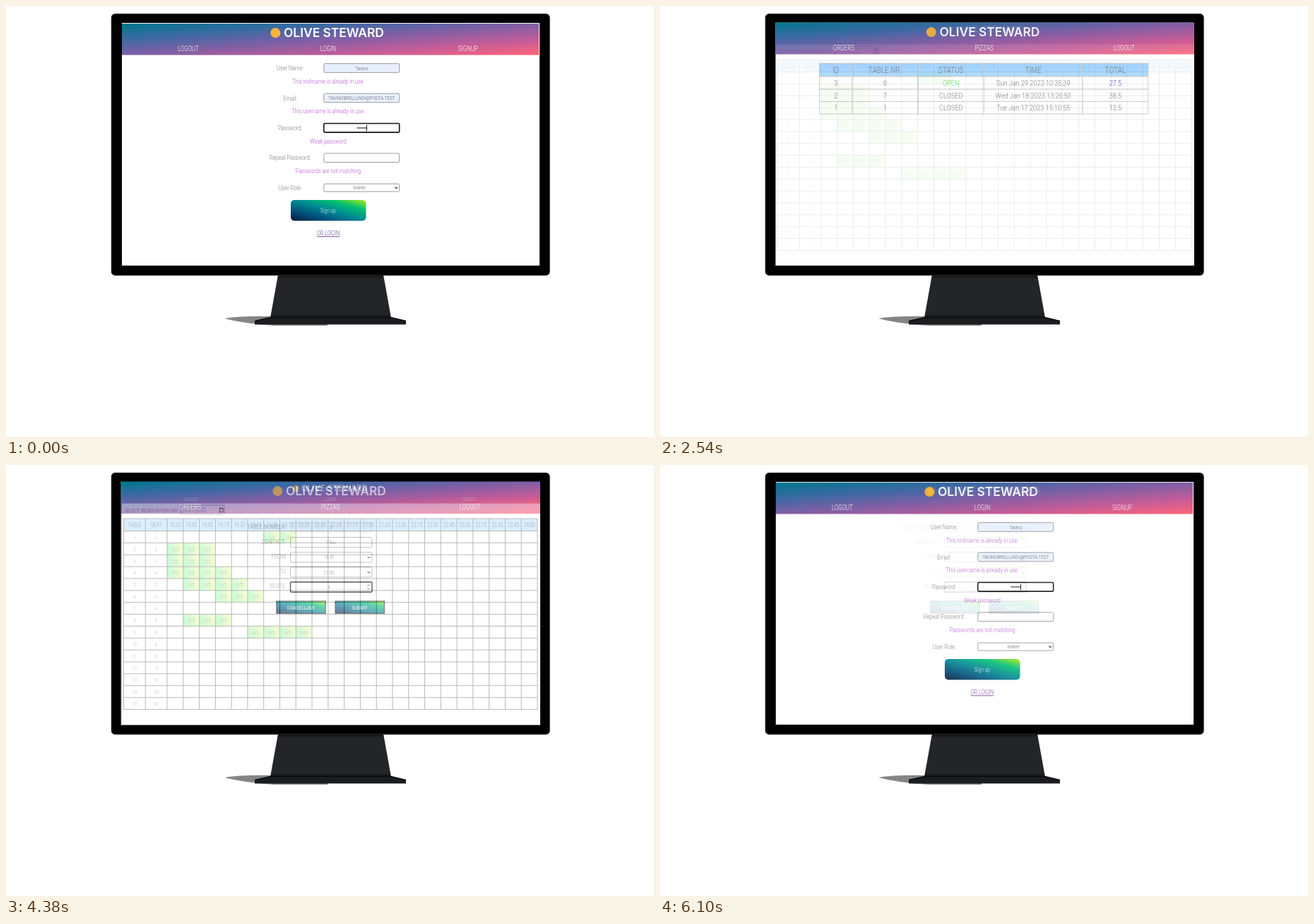
An HTML page that plays this animation: 917x611 px, repeating every 6160 ms.

```html
<!DOCTYPE html>
<html lang="en">
<head>
<meta charset="utf-8">
<title>Monitor slideshow</title>
<style>
  html, body { margin: 0; width: 100%; height: 100%; overflow: hidden; background: #fff; }
  svg { display: block; }
  text { font-family: Roboto, sans-serif; font-weight: 300; }
  .title { font-family: Inter, sans-serif; font-weight: 600; fill: #fff; }
</style>
</head>
<body>
<svg id="stage" width="917" height="611" viewBox="0 0 917 611">
  <defs>
    <linearGradient id="header" x1="0" y1="0" x2="1" y2="1">
      <stop offset="0" stop-color="#00778c"/>
      <stop offset=".25" stop-color="#3a6aa3"/>
      <stop offset=".5" stop-color="#805fa5"/>
      <stop offset=".75" stop-color="#c35c99"/>
      <stop offset="1" stop-color="#ff6579"/>
    </linearGradient>
    <linearGradient id="button" x1="0" y1="1" x2="1" y2="0">
      <stop offset="0" stop-color="#051937"/>
      <stop offset=".25" stop-color="#004d7a"/>
      <stop offset=".5" stop-color="#008793"/>
      <stop offset=".75" stop-color="#00bf72"/>
      <stop offset="1" stop-color="#a8eb12"/>
    </linearGradient>
    <linearGradient id="booked" x1="0" y1=".2" x2="1" y2="0">
      <stop offset="0" stop-color="#86f3a4"/>
      <stop offset="1" stop-color="#f4fb86"/>
    </linearGradient>
    <linearGradient id="stand" x1="0" y1="0" x2="0" y2="1">
      <stop offset="0" stop-color="#111214"/>
      <stop offset=".1" stop-color="#242529"/>
      <stop offset=".92" stop-color="#242529"/>
      <stop offset="1" stop-color="#0c0c0e"/>
    </linearGradient>
  </defs>
  <path d="M309 443Q335 439 376 440L372 452Q335 450 309 443Z" fill="#858585"/>
  <path d="M352 451H455V453H380Z" fill="#777"/>
  <path d="M385 381H534L545 442H374Z" fill="url(#stand)"/>
  <path d="M374 441H545L566 446V451.5H352V446Z" fill="#1b1c20"/>
  <path d="M352 446.5L374 441.5H545L566 446.5" fill="none" stroke="#08080a"/>
  <rect x="149.5" y="11.5" width="619.5" height="370" rx="5" stroke="#1d1d1d" stroke-width="1.5"/>
</svg>
<script>
const SQUEEZE = 0.78; // the screens are shown narrower than they were laid out
const GREY = '#777', PURPLE = '#b650d2', SKY = '#a6d5ff';

const box = (x1, y1, x2, y2, fill, stroke = 'none', extra = '') =>
  `<rect x="${x1}" y="${y1}" width="${x2 - x1}" height="${y2 - y1}" fill="${fill}" stroke="${stroke}" ${extra}/>`;

const text = (x, y, str, size, fill = GREY, anchor = 'middle', extra = '') =>
  `<text transform="translate(${x} ${y}) scale(${SQUEEZE} 1)" font-size="${size}" fill="${fill}" text-anchor="${anchor}" ${extra}>${str}</text>`;

const line = (d, color, width = 1) => `<path d="${d}" fill="none" stroke="${color}" stroke-width="${width}"/>`;

const chevron = (x, y) => line(`M${x - 2} ${y - 1}l2 2l2 -2`, '#333', 1.1);

const screen = (x1, y1, x2, y2) => box(160, 20, 759, 372, '#000') + box(x1, y1, x2, y2, '#fff');

function header([x1, y1, x2, y2], titleX, titleY, titleSize, links, navY, navSize) {
  const mark = titleSize * 0.4;
  return box(x1, y1, x2, y2, 'url(#header)') +
    `<circle cx="${titleX - titleSize * 0.67}" cy="${titleY - titleSize * 0.34}" r="${mark}" fill="#f5b43c"/>` +
    `<text class="title" x="${titleX}" y="${titleY}" font-size="${titleSize}">OLIVE STEWARD</text>` +
    links.map(([x, label]) => text(x, navY, label, navSize, '#fff')).join('');
}

function field(x1, y1, x2, y2, { value = '', fill = '#fff', focus = false, select = false, cx = (x1 + x2) / 2, border = '#999' } = {}) {
  const frame = box(x1, y1, x2, y2, fill, focus ? '#111' : border, `rx="1.5" stroke-width="${focus ? 1.6 : 1}"`);
  const mid = (y1 + y2) / 2;
  return frame + text(cx, mid + 2.6, value, 8, '#555') + (select ? chevron(x2 - 4.5, mid) : '');
}

function signup() {
  const labels = ['User Name:', 'Email:', 'Password:', 'Repeat Password:', 'User Role:'];
  const hints = ['This nickname is already in use.', 'This username is already in use.', 'Weak password', 'Passwords are not matching'];
  const fields = [
    { value: 'Tavino', fill: '#e8f0fe' },
    { value: 'TAVINOBRELLUNDI@POSTA.TEST', fill: '#e8f0fe' },
    { focus: true },
    {},
    { value: 'Waiter', select: true, cx: 500 },
  ];
  let out = screen(164, 24, 755, 368) +
    header([164, 25, 754, 69.5], 393, 44, 17.4, [[258, 'LOGOUT'], [456, 'LOGIN'], [654, 'SIGNUP']], 64, 10.2);
  fields.forEach((options, i) => {
    const y = 88 + i * 42.4, half = options.select ? 5.5 : 6.3;
    out += text(402, y + 3.2, labels[i], 9.5) + field(449.8, y - half, 556.7, y + half, options);
    if (hints[i]) out += text(456, y + 21.9, hints[i], 9.5, PURPLE);
  });
  for (let i = 0; i < 7; i++) out += `<circle cx="${497.5 + i * 2}" cy="172.8" r=".9" fill="#222"/>`;
  return out + line('M510.5 168.5v9', '#222') +
    box(403, 275, 509.5, 304.5, 'url(#button)', 'none', 'rx="5"') +
    text(456, 293, 'Sign up', 8.6, '#e4eeee') +
    text(456, 325.3, 'OR LOGIN', 9.5, '#703c98', 'middle', 'text-decoration="underline"');
}

function orders() {
  const cols = [225.5, 272, 365.2, 458.3, 598, 690.8];
  const edges = [81.5, 100, 118, 135.5, 153];
  const rows = [
    ['ID', 'TABLE NR.', 'STATUS', 'TIME', 'TOTAL'],
    ['3', '6', 'OPEN', 'Sun Jan 29 2023 10:35:39', '27.5'],
    ['2', '7', 'CLOSED', 'Wed Jan 18 2023 13:26:50', '38.5'],
    ['1', '1', 'CLOSED', 'Tue Jan 17 2023 15:10:55', '12.5'],
  ];
  const accents = { OPEN: '#4fdf4f', '27.5': '#3d3de8' };
  let out = screen(163.5, 23.5, 756, 368) +
    header([163.5, 23.5, 756, 68.5], 395.5, 43, 17.4, [[260, 'ORDERS'], [458.5, 'PIZZAS'], [657, 'LOGOUT']], 63, 10.2);
  rows.forEach((row, r) => row.forEach((cell, c) => {
    const top = edges[r], bottom = edges[r + 1];
    out += box(cols[c], top, cols[c + 1], bottom, r ? '#fff' : SKY, '#c8c8c8') +
      text((cols[c] + cols[c + 1]) / 2, (top + bottom) / 2 + 4.2, cell, r ? 11.8 : 12.8, accents[cell] || GREY);
  }));
  return out;
}

function reservations() {
  const seats = [2, 2, 2, 4, 5, 4, 4, 5, 6, 6, 6, 12, 10, 10, 8];
  // row, first time slot, labels
  const bookings = [
    [0, 6, '1/2 1/2'], [1, 0, '2/2 2/2 2/2'], [2, 0, '2/2 2/2 2/2'], [3, 0, '3/4 3/4 3/4 6/4'],
    [4, 1, '2/5 2/5 2/5 2/5'], [5, 3, '2/4 2/4 2/4'], [7, 1, '5/5 5/5 5/5'], [8, 5, '6/6 6/6 6/6 6/6'],
  ];
  const left = 166.5, seatX = 197.3, slotX = 228, right = 752, top = 76, first = 93.5, bottom = 346.5;
  const slots = 23, slotW = (right - slotX) / slots, rowH = (bottom - first) / seats.length;
  let out = screen(163.5, 24, 756, 368) +
    header([163.5, 24, 756, 54.5], 418, 37, 11.5, [[262, 'LOGOUT'], [459.5, 'LOGIN'], [656, 'SIGNUP']], 51, 6.8) +
    text(168.3, 66.7, 'SELECT RESERVATION DAY:', 7.9, '#222', 'start') +
    box(247.3, 57, 309, 70, '#fff', '#888', 'rx="1.5"') +
    text(249, 66.5, '29/01/2023', 8.3, '#555', 'start') +
    box(302.3, 61.3, 307, 66.7, '#fff', '#222') + line('M302 61.6h5.4', '#222', 1.6) +
    box(left, top, right, first, SKY);
  bookings.forEach(([row, slot, labels]) => labels.split(' ').forEach((label, i) => {
    const x = slotX + (slot + i) * slotW, y = first + row * rowH;
    out += box(x, y, x + slotW, y + rowH, 'url(#booked)') + text(x + slotW / 2, y + rowH / 2 + 2.9, label, 8, '#555');
  }));
  let grid = `M${left} ${top}H${right}M${left} ${top}V${bottom}M${seatX} ${top}V${bottom}`;
  for (let c = 0; c <= slots; c++) grid += `M${slotX + c * slotW} ${top}V${bottom}`;
  for (let r = 0; r <= seats.length; r++) grid += `M${left} ${first + r * rowH}H${right}`;
  out += line(grid, '#505050') + text(182, 87.7, 'TABLE', 8.6, '#222') + text(212.6, 87.7, 'SEAT', 8.6, '#222');
  for (let c = 0; c < slots; c++) {
    const minutes = 18 * 60 + 30 + c * 15;
    const label = `${Math.floor(minutes / 60)}:${String(minutes % 60).padStart(2, '0')}`;
    out += text(slotX + (c + 0.5) * slotW, 87.7, label, 8.6, '#222');
  }
  seats.forEach((count, r) => {
    const y = first + (r + 0.5) * rowH + 2.9;
    out += text(182, y, r + 1, 8, '#555') + text(212.6, y, count, 8, '#555');
  });
  return out;
}

function booking() {
  const rows = [
    ['TABLE NUMBER:', { value: '2', fill: '#f6f6f6', border: '#ddd' }],
    ['CONTACT:', { value: 'Tilvo' }],
    ['FROM', { value: '19:30', select: true, cx: 457 }],
    ['TO', { value: '21:00', select: true, cx: 457 }],
    ['SEATS:', { value: '4', focus: true, cx: 457 }],
  ];
  let out = screen(162.5, 23, 756, 369) +
    header([162.5, 23, 756, 69], 396, 43, 17.4, [[261, 'ORDERS'], [459, 'PIZZAS'], [656.5, 'LOGOUT']], 63, 10.2);
  rows.forEach(([label, options], i) => {
    const y = 88.5 + i * 21.1;
    out += text(396, y + 2.3, label, 9.5, GREY, 'end') + field(402.5, y - 7, 518, y + 7.2, options);
  });
  out += line('M511.5 171.5l1.7 -1.8l1.7 1.8M511.5 174.3l1.7 1.8l1.7 -1.8', '#444');
  [[382.8, 'CANCELLAMI'], [466, 'SUBMIT']].forEach(([x, label]) => {
    out += box(x, 193, x + 69.3, 210.3, 'url(#button)', '#222', 'stroke-width="1.2"') +
      text(x + 34.5, 204.7, label, 8.1, '#fff', 'middle', 'style="font-weight:400"');
  });
  return out;
}

const stage = document.getElementById('stage');
stage.insertAdjacentHTML('beforeend',
  [signup, orders, reservations, booking].map(draw => `<g class="scene">${draw()}</g>`).join(''));
const scenes = [...stage.querySelectorAll('.scene')];

const HOLD = 1000, STEP = 60, SLOT = 1540, LOOP = SLOT * scenes.length;

function render(now) {
  const t = now % LOOP;
  const current = Math.floor(t / SLOT);
  const faded = t - current * SLOT - HOLD;
  const mix = faded < 0 ? 0 : (Math.floor(faded / STEP) + 1) / 10;
  const opacity = scenes.map(() => 0);
  if (current === scenes.length - 1) {
    // the first scene lies below the last, so the last one fades out over it
    opacity[0] = 1;
    opacity[current] = 1 - mix;
  } else {
    opacity[current] = 1;
    opacity[current + 1] = mix;
  }
  scenes.forEach((scene, i) => {
    scene.style.opacity = opacity[i];
    scene.style.display = opacity[i] ? '' : 'none';
  });
}

const start = performance.now();
function tick() {
  render(performance.now() - start);
  requestAnimationFrame(tick);
}
tick();
</script>
</body>
</html>
```
